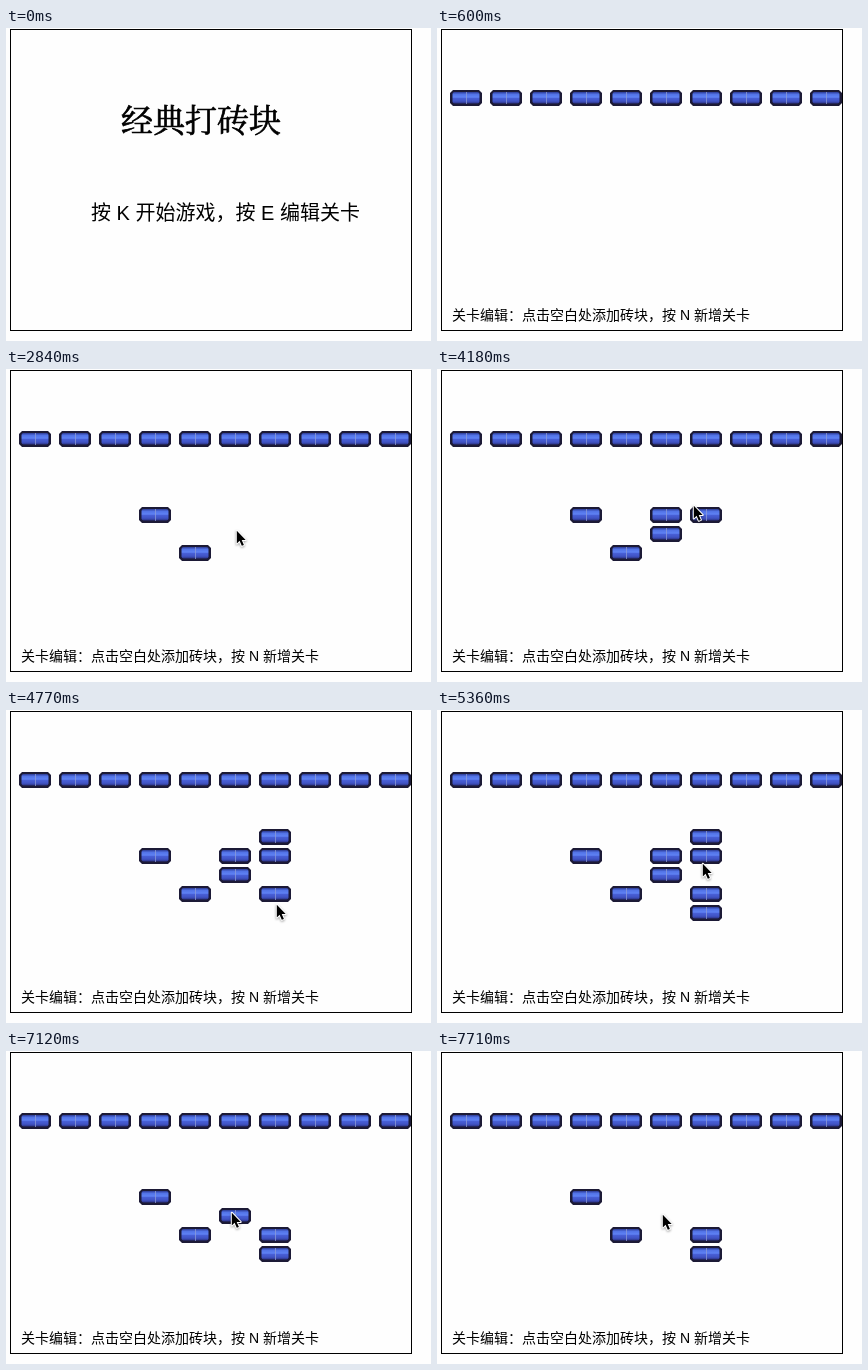
Animation, 425 px wide and 313 px high, one loop 8000 ms. Source, as an HTML page:

```html
<!DOCTYPE html>
<html lang="zh-CN">
<head>
<meta charset="utf-8">
<title>打砖块关卡编辑</title>
<style>
  html, body { margin: 0; width: 100%; height: 100%; overflow: hidden; background: #fefefe; }
  svg { display: block; width: 425px; height: 313px; }
  text { font-family: "Liberation Sans", "Noto Sans CJK SC", "Noto Sans CJK", sans-serif; fill: #000; }
  .title {
    font-family: "Noto Serif CJK SC", "Songti SC", "Noto Sans CJK SC", "Noto Sans CJK", serif;
    stroke: #000; stroke-width: .7px;
  }
  #cursor { filter: drop-shadow(0 1px 1px rgba(0, 0, 0, .35)); }
</style>
</head>
<body>
<svg viewBox="0 0 425 313">
  <defs>
    <linearGradient id="face" x2="0" y2="1">
      <stop offset="0" stop-color="#2c3a94"/>
      <stop offset=".2" stop-color="#5273e6"/>
      <stop offset=".45" stop-color="#5f82f4"/>
      <stop offset=".55" stop-color="#485fd6"/>
      <stop offset=".8" stop-color="#4053c4"/>
      <stop offset="1" stop-color="#2c3282"/>
    </linearGradient>
    <g id="brick">
      <path d="M3 0H29L32 3V13L29 16H3L0 13V3Z" fill="#1c1a36"/>
      <rect x="2.5" y="2" width="27" height="11.5" rx="2" fill="url(#face)"/>
      <path d="M16.5 2V14" stroke="#8f9cd4" stroke-opacity=".75"/>
    </g>
  </defs>
  <g id="intro">
    <text class="title" x="115" y="104" font-size="32">经典打砖块</text>
    <text x="85" y="192" font-size="20">按 K 开始游戏，按 E 编辑关卡</text>
  </g>
  <g id="editor">
    <g id="bricks"></g>
    <text x="15" y="292" font-size="14">关卡编辑：点击空白处添加砖块，按 N 新增关卡</text>
  </g>
  <rect x="4.5" y="1.5" width="401" height="301" fill="none" stroke="#000"/>
  <path id="cursor" d="M.8 .8V13.4L3.6 10.8L5.8 15.8L7.9 14.9L5.7 10H9.7Z"
    fill="#000" stroke="#fff" stroke-width="2" paint-order="stroke" stroke-linejoin="round"/>
</svg>
<script>
const LOOP = 8000, EDIT_AT = 600, MOVE_AT = 1950, TICK = 147.5;
const LEFT = 13, TOP = 61, STEP_X = 40, STEP_Y = 19;
const $ = id => document.getElementById(id);

// Each click: tick of arrival, pointer x, y. It toggles the brick below one tick later.
const start = [0, 155, 178];
const clicks = [
  [1, 150, 145], [3, 187, 184], [7, 231, 161], [9, 235, 144],
  [10, 259, 140], [15, 256, 136], [18, 276, 180], [19, 270, 194],
  [23, 265, 153], [30, 262, 130], [31, 228, 137], [38, 225, 163]
];
const stops = [start, ...clicks];

const easeOut = u => 1 - (1 - u) ** 3;

function show(el, on) {
  el.style.display = on ? "" : "none";
}

function addBrick(col, row) {
  const el = document.createElementNS("http://www.w3.org/2000/svg", "use");
  el.setAttribute("href", "#brick");
  el.setAttribute("x", LEFT + STEP_X * col);
  el.setAttribute("y", TOP + 1 + STEP_Y * row);
  return $("bricks").appendChild(el);
}

function pointerAt(tick) {
  const next = stops.findIndex(([t]) => t > tick);
  if (next < 1) return stops.at(next).slice(1);
  const [t0, ...from] = stops[next - 1], [t1, ...to] = stops[next];
  const k = easeOut((tick - t0) / (t1 - t0));
  return from.map((v, i) => Math.round(v + (to[i] - v) * k));
}

for (let col = 0; col < 10; col++) addBrick(col, 0);

// Group the click ticks by grid cell
const cells = new Map();
for (const [tick, x, y] of clicks) {
  const col = Math.floor((x - LEFT) / STEP_X), row = Math.floor((y - TOP) / STEP_Y);
  const key = `${col},${row}`;
  if (!cells.has(key)) cells.set(key, { el: addBrick(col, row), ticks: [] });
  cells.get(key).ticks.push(tick);
}

function draw(time) {
  const tick = Math.floor((time - MOVE_AT) / TICK);
  show($("intro"), time < EDIT_AT);
  show($("editor"), time >= EDIT_AT);
  show($("cursor"), tick >= 0);
  for (const { el, ticks } of cells.values()) {
    show(el, ticks.filter(t => t < tick).length % 2);
  }
  $("cursor").setAttribute("transform", `translate(${pointerAt(Math.max(tick, 0))})`);
}

let began;
function frame(now) {
  began ??= now;
  draw((now - began) % LOOP);
  requestAnimationFrame(frame);
}
draw(0);
requestAnimationFrame(frame);
</script>
</body>
</html>
```
